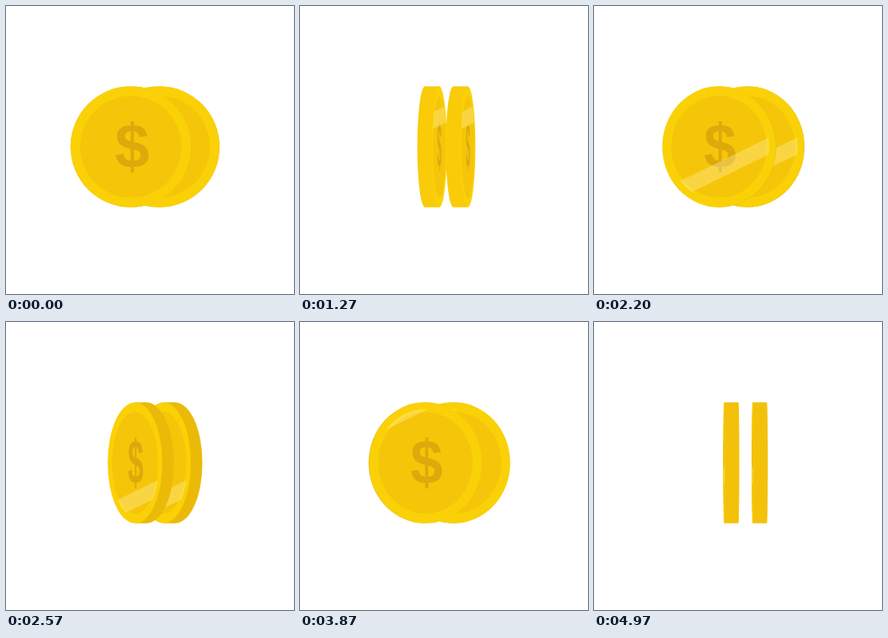
Recreate the animation shown at these times as an HTML page with a canvas. Size 360 by 360 pixels, loop 5000 ms.

```html
<!DOCTYPE html>
<html lang="en">
<head>
<meta charset="utf-8">
<title>Spinning coins</title>
<style>
html, body { margin: 0; width: 100%; height: 100%; overflow: hidden; background: #fff; }
canvas { display: block; width: 360px; height: 360px; }
</style>
</head>
<body>
<canvas id="stage" width="360" height="360"></canvas>
<script>
const ctx = document.getElementById('stage').getContext('2d');
const LOOP = 5000, HALF_TURN = 2000, SHINE = 3000;
const CY = 176, R = 75.6, INNER = 63.5, GAP = 35.6, THICK = 18;
const RIM = '#fad106', FACE = '#f5c509', SIGN = '#dda90b';

// Side colour over the turn: [phase, r, g, b]
const SIDE = [
  [-1, 240, 188, 8], [-0.77, 249, 203, 8], [-0.3, 232, 183, 12],
  [0.6, 235, 186, 8], [1, 245, 195, 10]
];

const smooth = x => {
  x = Math.min(1, Math.max(0, x));
  return x * x * (3 - 2 * x);
};

function sideColor(u) {
  let i = 1;
  while (i < SIDE.length - 1 && u > SIDE[i][0]) i++;
  const a = SIDE[i - 1], b = SIDE[i];
  const p = (u - a[0]) / (b[0] - a[0]);
  const mix = n => Math.round(a[n] + (b[n] - a[n]) * p);
  return `rgb(${mix(1)},${mix(2)},${mix(3)})`;
}

function oval(x, r, s) {
  ctx.beginPath();
  ctx.ellipse(x, CY, Math.max(r * s, 0.2), r, 0, 0, Math.PI * 2);
}

function fillOval(x, r, s, color) {
  oval(x, r, s);
  ctx.fillStyle = color;
  ctx.fill();
}

function pose(t) {
  // u runs from edge-on (-1) through face-on (0) to edge-on (1)
  const u = ((t - 40 + HALF_TURN / 2) % HALF_TURN) / (HALF_TURN / 2) - 1;
  const v = Math.abs(u);
  const k = smooth((v - 0.1) / 0.6);
  const mid = 156 + 15.5 * (u < 0 ? v * v : k);
  const shift = (u < 0 ? 1 : -1) * THICK * k / 2;
  return {
    u,
    scale: Math.max((1 + Math.cos(Math.PI * u)) / 2, 0.015),
    front: mid + shift,
    back: mid - shift
  };
}

function drawShine(x, s, y) {
  const slope = 0.49, half = 10.5, w = 90;
  ctx.save();
  oval(x, 67, s);
  ctx.clip();
  ctx.beginPath();
  ctx.moveTo(x - w, y + w * slope - half);
  ctx.lineTo(x + w, y - w * slope - half);
  ctx.lineTo(x + w, y - w * slope + half);
  ctx.lineTo(x - w, y + w * slope + half);
  ctx.fillStyle = 'rgba(255,246,190,0.32)';
  ctx.fill();
  ctx.restore();
}

function drawCoin(p, dx, shineY) {
  const front = p.front + dx, back = p.back + dx, s = p.scale;
  const side = sideColor(p.u);
  fillOval(back, R, s, side);
  ctx.fillRect(Math.min(front, back), CY - R, Math.abs(front - back), 2 * R);
  fillOval(front, R, s, RIM);
  fillOval(front, INNER, s, FACE);

  ctx.save();
  ctx.translate(front + 1.5 * s, 202);
  ctx.scale(s, 1);
  ctx.font = 'bold 78px "Liberation Sans", Arial, sans-serif';
  ctx.textAlign = 'center';
  ctx.fillStyle = SIGN;
  ctx.fillText('$', 0, 0);
  ctx.restore();

  drawShine(front, s, shineY);
}

function draw(t) {
  ctx.fillStyle = '#fff';
  ctx.fillRect(0, 0, 360, 360);
  const p = pose(t);
  const q = t % SHINE - 1770;
  const shineY = 179 + 0.07 * q - 0.00002 * q * q;
  drawCoin(p, GAP, shineY);
  drawCoin(p, 0, shineY);
}

const start = performance.now();
function tick(now) {
  draw(Math.max(0, now - start) % LOOP);
  requestAnimationFrame(tick);
}
draw(0);
requestAnimationFrame(tick);
</script>
</body>
</html>
```
